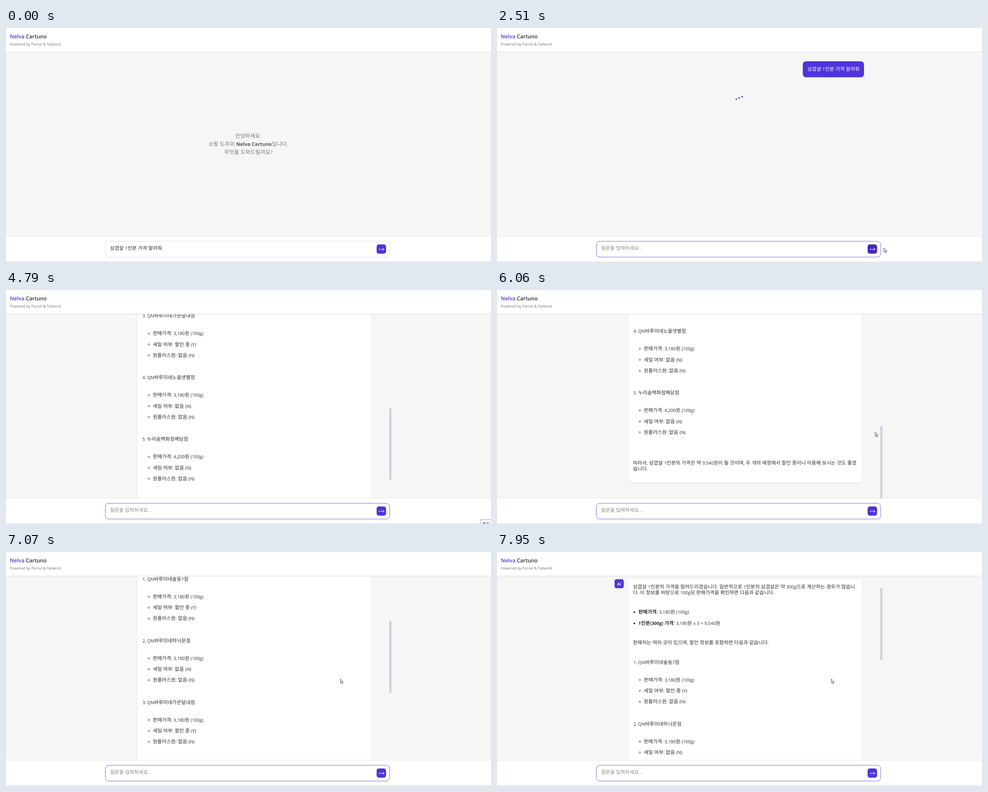
Recreate the animation shown at these times as an HTML page. Size 1077x520 px, loop 8 s.

```html
<!DOCTYPE html>
<html lang="ko">
<head>
<meta charset="utf-8">
<style>
  html, body { margin: 0; height: 100%; overflow: hidden; background: #fff; }
  svg { display: block; width: 1077px; height: 520px; }
  text { font: 11px "Open Sans", "Noto Sans CJK KR", sans-serif; fill: #2b2b2b; text-rendering: geometricPrecision; }
  .latin { font-size: .9em; }
  .bold { font-weight: 700; }
  .title { font-size: 11.8px; font-weight: 600; }
  .small { font-size: 8.4px; fill: #737373; }
  .welcome { font-size: 12px; fill: #777; text-anchor: middle; }
  .name { font-size: 11px; font-weight: 700; fill: #555; }
  .white { fill: #fff; }
  .badge { font-size: 8px; font-weight: 700; fill: #fff; text-anchor: middle; }
  .hint { fill: #858585; }
  .tip { font-size: 9px; }
  .accent { fill: #5034db; }
</style>
</head>
<body>
<svg viewBox="0 0 1077 520">
  <defs>
    <clipPath id="view"><rect y="54" width="1077" height="409"/></clipPath>
    <filter id="shadow" x="-5%" y="-5%" width="110%" height="110%">
      <feDropShadow dx="0" dy=".7" stdDeviation=".9" flood-opacity=".13"/>
    </filter>
  </defs>
  <rect y="54" width="1077" height="409" fill="#f6f6f6"/>
  <g clip-path="url(#view)">
    <g id="welcome"></g>
    <g id="chat">
      <g id="question"></g>
      <g id="answer"></g>
    </g>
    <g id="dots" class="accent"></g>
    <rect id="thumb" x="851" width="5" height="161" rx="2.5" fill="#cbd5e1"/>
  </g>
  <path d="M0 53.5H1077" stroke="#e3e3e5" stroke-width="1.4"/>
  <path d="M0 462.9H1077" stroke="#e8e8ea"/>
  <path d="M0 519.3H1077" stroke="#dcdce0"/>
  <g id="header"></g>
  <rect id="field" x="220.5" y="474" width="631.5" height="35" rx="7.5" fill="#fff"/>
  <g id="typed"></g>
  <g id="hint"></g>
  <rect id="send" x="823" y="481" width="21" height="20.5" rx="5"/>
  <path d="M827.5 491.7H839.5M836.5 489L839.5 491.7L836.5 494.4" fill="none" stroke="#fff"/>
  <g id="tip">
    <rect x="1053.5" y="510.5" width="30" height="20" fill="#fff" stroke="#9a9a9a"/>
  </g>
  <path id="cursor" d="M.4.5V9.4L2.4 7.6L3.8 10.8L5.3 10.1L3.9 7.1H6.4Z" fill="#fff" stroke="#333" stroke-width=".9"/>
</svg>
<script>
const $ = id => document.getElementById(id);
const add = (id, markup) => $(id).insertAdjacentHTML('beforeend', markup);
const show = (id, on) => $(id).style.display = on ? '' : 'none';
const latin = s => s.replace(/[!-~]+/g, '<tspan class="latin">$&</tspan>');
const text = (x, y, s, cls = '') => `<text x="${x}" y="${y}" class="${cls}">${latin(s)}</text>`;
// Bold label followed by regular text
const pair = (x, y, label, rest) =>
  `<text x="${x}" y="${y}"><tspan class="bold">${latin(label)}</tspan>${latin(rest)}</text>`;

const QUESTION = '삼겹살 1인분 가격 알려줘';
const STORES = [
  ['QN바루미네솔동7점', '3,180', true],
  ['QN바루미네하늬문점', '3,180', false],
  ['QN바루미네가온달내점', '3,180', true],
  ['QN바루미네노을샛별점', '3,180', false],
  ['누리솜백화점해담점', '4,200', false],
];
const MAX_SCROLL = 629;

add('header', `<text x="8.5" y="22.5" class="title"><tspan class="accent">Nelva</tspan> Cartuno</text>
  <text x="8.5" y="39" class="small">Powered by Parcel &amp; Tailwind</text>`);
add('welcome', text(538, 243.5, '안녕하세요.', 'welcome') +
  '<text x="538" y="261.5" class="welcome">쇼핑 도우미 <tspan class="name">Nelva Cartuno</tspan>입니다.</text>' +
  text(538, 279.5, '무엇을 도와드릴까요?', 'welcome'));
add('question', '<rect x="679" y="74" width="136" height="35.5" rx="7" class="accent"/>' +
  text(689.5, 95, QUESTION, 'white'));
add('typed', text(231, 493, QUESTION));
add('hint', text(231, 493, '질문을 입력하세요...', 'hint'));
add('tip', text(1057.5, 523, '정지', 'tip'));

add('answer', `<rect x="261" y="125" width="20.5" height="20" rx="4.5" class="accent"/>
  <text x="271.2" y="138" class="badge">AI</text>
  <rect x="292" y="125" width="518.5" height="932" rx="8" fill="#fff" filter="url(#shadow)"/>
  <circle cx="305" cy="198.3" r="1.7"/><circle cx="305" cy="223.3" r="1.7"/>` +
  text(302, 145, '삼겹살 1인분의 가격을 알려드리겠습니다. 일반적으로 1인분의 삼겹살은 약 300g으로 계산하는 경우가 많습니') +
  text(302, 158, '다. 이 정보를 바탕으로 100g당 판매가격을 확인하면 다음과 같습니다:') +
  pair(314, 201.5, '판매가격', ': 3,180원 (100g)') +
  pair(314, 226.5, '1인분(300g) 가격', ': 3,180원 x 3 = 9,540원') +
  text(302, 269.7, '판매처는 여러 곳이 있으며, 할인 정보를 포함하면 다음과 같습니다:') +
  text(302, 1017, '따라서, 삼겹살 1인분의 가격은 약 9,540원이 될 것이며, 두 개의 매장에서 할인 중이니 이용해 보시는 것도 좋겠') +
  text(302, 1030, '습니다.'));

STORES.forEach(([name, price, sale], i) => {
  const y = 313 + i * 137;
  add('answer', text(303, y, `${i + 1}.`) + text(313.5, y, name));
  [`판매가격: ${price}원 (100g)`, `세일 여부: ${sale ? '할인 중 (Y)' : '없음 (N)'}`, '원플러스원: 없음 (N)']
    .forEach((line, j) => {
      const ly = y + 39.2 + j * 24.3;
      add('answer', `<circle cx="317.2" cy="${ly - 3.4}" r="1.8" fill="none" stroke="#333" stroke-width=".8"/>` +
        text(326, ly, line));
    });
});
for (let i = 0; i < 3; i++) add('dots', `<circle cx="${531.3 + i * 6.6}" r="1.75"/>`);

// Linear interpolation through [time, ...values] keys
function along(keys, t) {
  const i = keys.findIndex(k => k[0] > t);
  if (i < 1) return (i ? keys[keys.length - 1] : keys[0]).slice(1);
  const [a, b] = [keys[i - 1], keys[i]];
  const p = (t - a[0]) / (b[0] - a[0]);
  return a.slice(1).map((v, n) => v + (b[n + 1] - v) * p);
}
const easeInOut = p => p < .5 ? 2 * p * p : 1 - 2 * (1 - p) ** 2;

const WHEEL = [[6400, MAX_SCROLL], [7070, 250], [7310, 146], [7710, 146], [7950, 64.5]];
const POINTER = [[70, 836, 490], [400, 866, 497], [1780, 866, 497], [2400, 859, 488.5], [2640, 859, 488.5],
  [3300, 990, 525], [3500, 1070, 530], [5750, 1070, 530], [6060, 839.8, 315.5], [6450, 742.3, 281.8]];

function scrollAt(t) {
  if (t < 6400) return MAX_SCROLL * easeInOut(Math.min(1, Math.max(0, (t - 4390) / 562)));
  return along(WHEEL, t)[0];
}

function draw(t) {
  const sent = t >= 70, answered = t >= 4330;
  const scroll = Math.round(scrollAt(t) * 2) / 2;
  show('welcome', !sent);
  show('typed', !sent);
  show('hint', sent);
  show('question', sent);
  show('cursor', sent);
  show('dots', sent && !answered);
  show('answer', answered);
  show('thumb', answered);
  show('tip', t >= 4000 && t < 5800);

  $('field').setAttribute('stroke', sent ? '#7564e2' : '#dfdfe9');
  $('send').setAttribute('fill', sent && t < 2640 ? '#452abd' : '#5034db');
  $('question').setAttribute('transform', `translate(${answered ? -5 : 0})`);
  $('chat').setAttribute('transform', `translate(0 ${-scroll})`);
  $('thumb').setAttribute('y', 54 + scroll * 248 / MAX_SCROLL);
  $('cursor').setAttribute('transform', `translate(${along(POINTER, t)})`);

  const phase = (t - 2510) / 600 * 2 * Math.PI + .85;
  [...$('dots').children].forEach((dot, i) =>
    dot.setAttribute('cy', 155.5 + 3.7 * Math.sin(phase - i * .85)));
}

function tick() {
  draw(performance.now() % 8000);
  requestAnimationFrame(tick);
}
tick();
</script>
</body>
</html>
```
